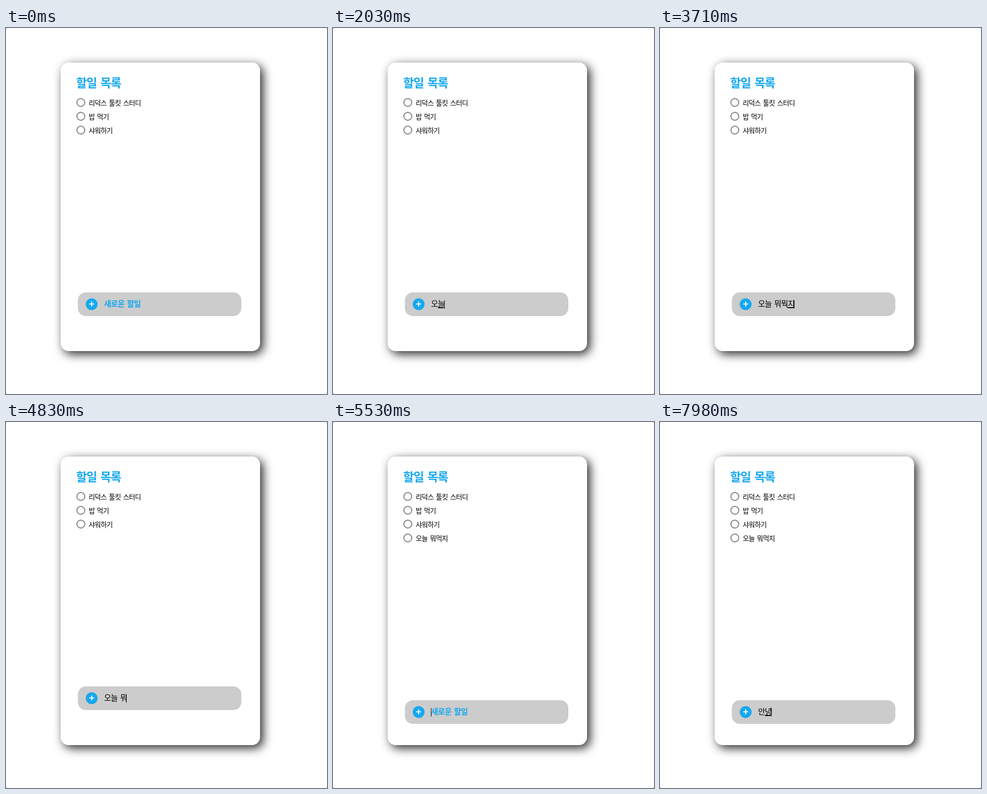
An HTML page for the animation above (8 s loop, 652 px wide and 742 px high).

```html
<!DOCTYPE html>
<html lang="ko">
<head>
<meta charset="utf-8">
<style>
  html, body { margin: 0; width: 100%; height: 100%; overflow: hidden; background: #fff; }
  #card { position: absolute; left: 111px; top: 70px; width: 405px; height: 585px;
    border-radius: 16px; background: #fff; box-shadow: 6px 6px 20px rgba(0,0,0,.85); }
  svg { position: absolute; left: 0; top: 0; }
  text { font-family: "Noto Sans CJK KR", "Noto Sans CJK", sans-serif;
    letter-spacing: -.055em; word-spacing: .1em; white-space: pre; }
  .blue { fill: #16a8f0; }
  .bold { font-weight: 700; }
  .item text { font-size: 14px; font-weight: 500; }
  .item circle { fill: #fff; stroke: #808080; stroke-width: 2; }
  #bar text { font-size: 16px; }
</style>
</head>
<body>
<div id="card"></div>
<svg width="652" height="742">
  <path d="M0 0h1v1H0zM651 0h1v1h-1zM0 741h1v1H0zM651 741h1v1h-1z" fill="#555"/>
  <text class="blue bold" x="142.5" y="120" font-size="24">할일 목록</text>
  <g id="list"></g>
  <g id="bar">
    <rect x="146" y="536" width="332" height="48" rx="16" fill="#ccc"/>
    <circle class="blue" cx="174" cy="560" r="12"/>
    <path d="M169 559.5h10M174 554.5v10" stroke="#fff" stroke-width="2"/>
    <text id="hint" class="blue bold" x="199" y="565">새로운 할일</text>
    <text id="typed" x="199" y="565"></text>
    <rect id="mark" y="566" height="2"/>
    <rect id="caret" y="552" width="1" height="17"/>
  </g>
</svg>
<script>
const LOOP = 8000, SENT = 5530, EM = 16;
const $ = id => document.getElementById(id);

// [time, text]; "_" precedes the syllable still being composed
const typing = [
  [0, ""], [1610, "_ㅇ"], [1750, "_오"], [1820, "_온"], [1890, "오_느"], [2030, "오_늘"],
  [2170, "오늘 "], [2240, "오늘 _ㅁ"], [2310, "오늘 _무"], [2450, "오늘 _뭐"], [2590, "오늘 _뭠"],
  [2730, "오늘 뭐_무"], [2870, "오늘 뭐_뭐"], [3010, "오늘 뭐_뭑"],
  [3430, "오늘 뭐뭑_ㅈ"], [3570, "오늘 뭐뭑_지"],
  [4060, "오늘 뭐뭑_ㅈ"], [4340, "오늘 뭐뭑"], [4830, "오늘 뭐"],
  [4900, "오늘 뭐_ㅁ"], [4970, "오늘 뭐_머"], [5110, "오늘 뭐_먹"], [5390, "오늘 뭐먹_지"],
  [SENT, ""], [7490, "_ㅇ"], [7630, "_아"], [7770, "_안"], [7840, "안_ㄴ"], [7910, "안_녀"], [7980, "안_녕"]
];
const blinks = [[0, 0], [420, 1], [910, 0], [1400, 1], [6090, 0], [6580, 1], [7070, 0], [7490, 1]];

const at = (steps, t) => steps.findLast(s => s[0] <= t)[1];
const width = s => [...s].reduce((w, c) => w + (c === " " ? .27 : .865) * EM, 0);

$("list").innerHTML = ["리덕스 툴킷 스터디", "밥 먹기", "샤워하기", "오늘 뭐먹지"].map((label, i) =>
  `<g class="item" transform="translate(0 ${i * 28})">
    <circle cx="152" cy="151" r="8"/><text x="168" y="156.5">${label}</text></g>`).join("");
const added = $("list").lastElementChild;

function draw(now) {
  const t = now % LOOP, sent = t >= SENT;
  const [done, part = ""] = at(typing, t).split("_");
  added.style.display = sent ? "" : "none";
  $("bar").setAttribute("transform", `translate(0 ${sent ? 28 : 0})`);
  $("hint").style.display = done + part ? "none" : "";
  $("typed").textContent = done + part;
  $("mark").setAttribute("x", Math.round(199.4 + width(done)));
  $("mark").setAttribute("width", part ? 12 : 0);
  $("caret").setAttribute("x", Math.floor(199 + width(done + part)));
  $("caret").style.display = at(blinks, t) ? "" : "none";
}
function tick(now) {
  draw(now);
  requestAnimationFrame(tick);
}
draw(0);
requestAnimationFrame(tick);
</script>
</body>
</html>
```
